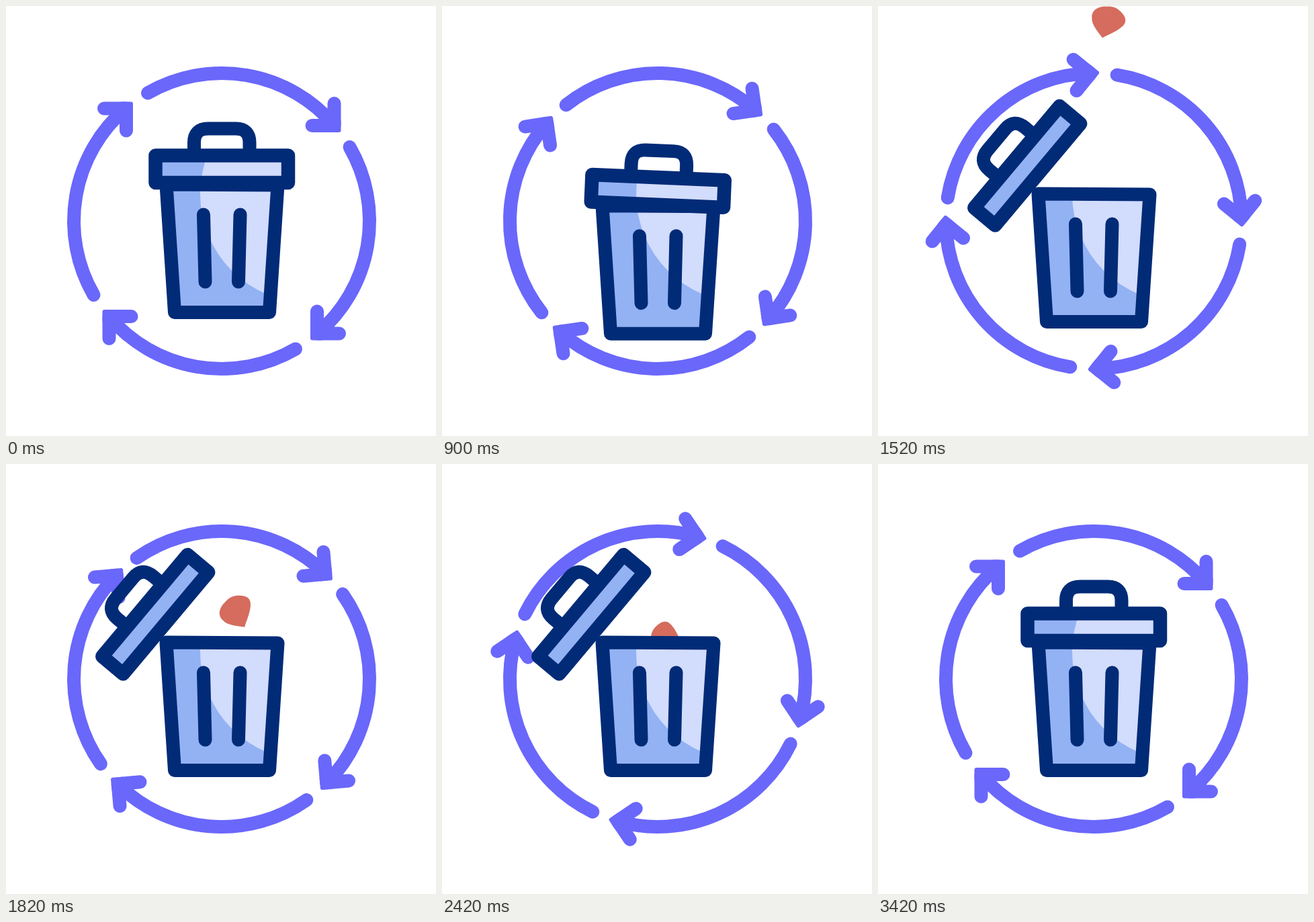
An HTML page with a canvas that plays this animation: 640x640 px, repeating every 3.6 s.

```html
<!DOCTYPE html>
<html lang="en">
<head>
<meta charset="utf-8">
<title>Recycling bin</title>
<style>
html, body { margin: 0; width: 100%; height: 100%; overflow: hidden; background: #fff; }
canvas { display: block; width: 640px; height: 640px; }
</style>
</head>
<body>
<canvas id="stage"></canvas>
<script>
const LOOP = 3600, END = 3420, SIZE = 640;
const NAVY = '#022b77', BLUE = '#93b2f4', LIGHT = '#d2dcfd', RING = '#6a67fb', RED = '#d56c5e';
const rad = Math.PI / 180;

const canvas = document.getElementById('stage');
const ctx = canvas.getContext('2d');
const dpr = window.devicePixelRatio || 1;
canvas.width = canvas.height = SIZE * dpr;

const body = new Path2D('M238.5 265.5L404.5 266.5L392 456H251Z');
const bars = new Path2D('M294 310.5L296.5 410.5M348.5 310.5L346 410.5');
const lid = new Path2D('M222.5 222.5H420V263H222.5Z');
const handle = new Path2D('M280 222V203.5Q280 182.5 301 182.5H342Q362.5 182.5 362.5 203.5V222');
const scrap = new Path2D('M14 24C3 22-11 22-18 14C-27 6-23-5-16-12C-8-21-3-23 6-23C18-23 24-18 23-8C22 4 17 14 14 24Z');

const shine = new Path2D();
shine.arc(450.5, 280, 161.5, 0, 7);

const arrow = new Path2D();
arrow.arc(0, 0, 220, -120 * rad, -40.5 * rad);
arrow.moveTo(167.5, -175);
arrow.lineTo(167.5, -142);
arrow.lineTo(134.5, -142);
const tip = new Path2D();
tip.roundRect(157.5, -152, 20, 20, 3);

const smooth = s => s * s * (3 - 2 * s);
const part = (t, a, b) => Math.min(1, Math.max(0, (t - a) / (b - a)));

// Eased value through a list of [time, value] keys.
function track(keys, t) {
  let i = 0;
  while (i < keys.length - 2 && t > keys[i + 1][0]) i++;
  const [a, from] = keys[i], [b, to] = keys[i + 1];
  return from + (to - from) * smooth(part(t, a, b));
}

// Timing curve with flat ends; x1 and x2 set the handle lengths.
function curve(x, x1, x2) {
  let lo = 0, hi = 1;
  for (let i = 0; i < 24; i++) {
    const s = (lo + hi) / 2, u = 1 - s;
    if (3 * s * u * (u * x1 + s * x2) + s ** 3 < x) lo = s; else hi = s;
  }
  return smooth(lo);
}

const BACK = -25.6, TURN = 480;
const binKeys = [[0, 0], [480, -41], [985, 37.5], [1240, 37.5], [1720, 0]];
const hopKeys = [[0, 0], [480, -11], [900, 1], [1000, 0]];
const tiltKeys = [[0, 0], [480, -2.4], [900, 2.4], [1120, 0]];
const openKeys = [[980, 0], [1500, 1], [2620, 1], [3220, 0]];

const spin = t => t < TURN
  ? BACK * smooth(t / TURN)
  : BACK + (360 - BACK) * curve(part(t, TURN, END), 0.07, 0.297);

function stroke(path, color, width = 20) {
  ctx.strokeStyle = color;
  ctx.lineWidth = width;
  ctx.stroke(path);
}

// Fills a moving shape; the highlight stays fixed on the stage.
function shade(path) {
  ctx.fillStyle = BLUE;
  ctx.fill(path);
  ctx.save();
  ctx.clip(path);
  ctx.setTransform(dpr, 0, 0, dpr, 0, 0);
  ctx.fillStyle = LIGHT;
  ctx.fill(shine);
  ctx.restore();
}

function drawRing(t) {
  ctx.save();
  ctx.translate(321, 320);
  ctx.rotate(spin(t) * rad);
  ctx.fillStyle = RING;
  for (let i = 0; i < 4; i++) {
    stroke(arrow, RING);
    ctx.fill(tip);
    ctx.rotate(Math.PI / 2);
  }
  ctx.restore();
}

function drawScrap(t, at, x, y, angle) {
  const dt = t - at, drop = y + 0.75 * dt + 0.0003 * dt * dt;
  if (dt < -450 || drop > 380) return;
  ctx.save();
  ctx.translate(x, drop);
  ctx.rotate((angle - 0.15 * dt) * rad);
  ctx.fillStyle = RED;
  ctx.fill(scrap);
  ctx.restore();
}

function drawBin(t) {
  const open = track(openKeys, t), arch = open * (1 - open);
  ctx.save();
  ctx.translate(0, track(binKeys, t));
  shade(body);
  stroke(body, NAVY);
  stroke(bars, NAVY);

  ctx.translate(321.25 - 99 * open + 38 * arch, 242.75 + track(hopKeys, t) - 19 * open - 144 * arch);
  ctx.rotate((track(tiltKeys, t) - 50 * open) * rad);
  ctx.translate(-321.25, -242.75);
  ctx.lineCap = 'butt';
  stroke(handle, NAVY);
  shade(lid);
  stroke(lid, NAVY, 20.5);
  ctx.restore();
}

function draw(t) {
  ctx.setTransform(dpr, 0, 0, dpr, 0, 0);
  ctx.fillStyle = '#fff';
  ctx.fillRect(0, 0, SIZE, SIZE);
  ctx.lineCap = ctx.lineJoin = 'round';
  drawRing(t);
  drawScrap(t, 1820, 341, 218, 0);
  drawScrap(t, 2420, 331, 261, -45);
  drawBin(t);
}

const start = performance.now();
function tick() {
  draw(Math.min((performance.now() - start) % LOOP, END));
  requestAnimationFrame(tick);
}
tick();
</script>
</body>
</html>
```
